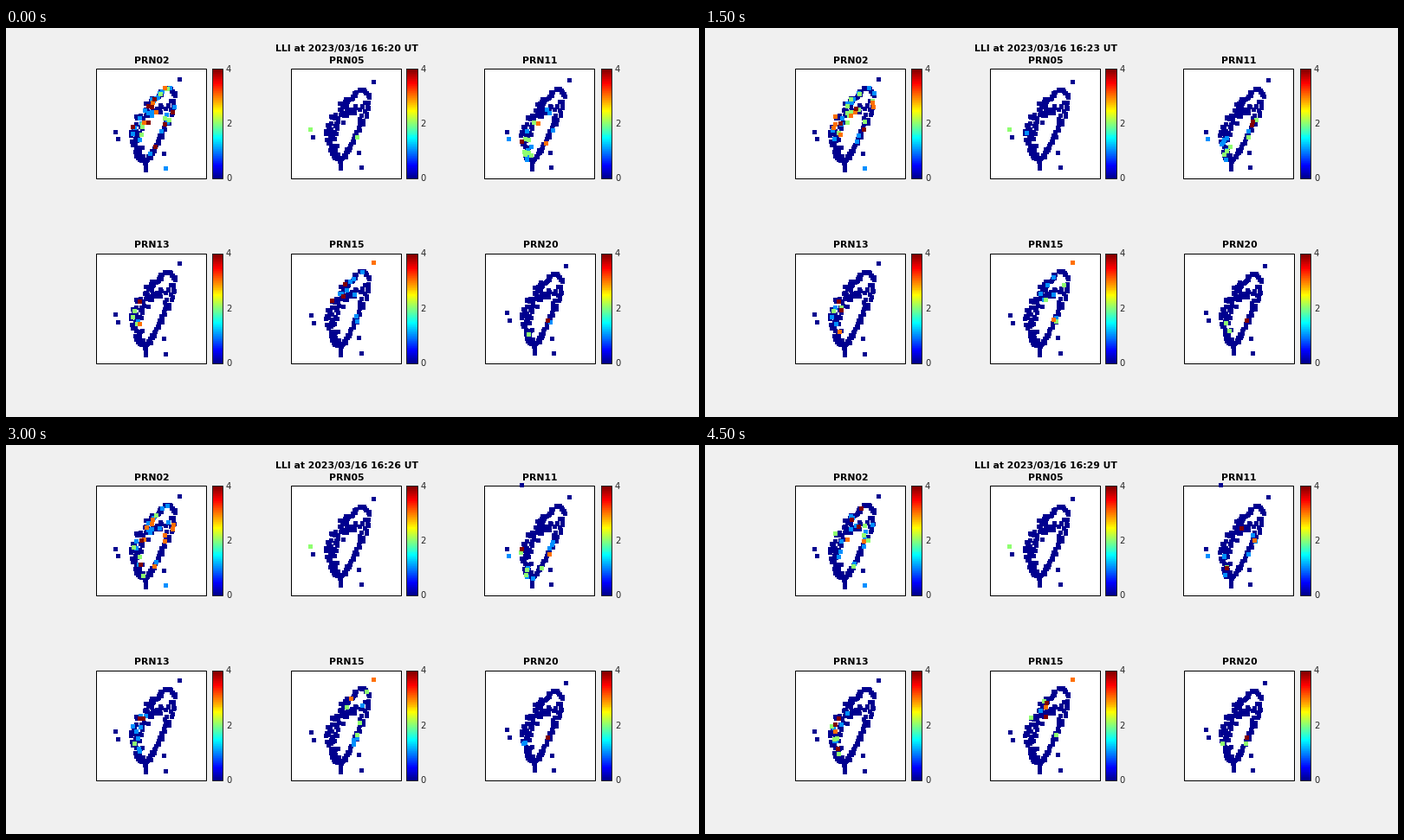
Recreate the animation shown at these times as a matplotlib script. Size 800 px wide and 450 px high, loop 5 s.

```python
import numpy as np
import matplotlib.pyplot as plt
from matplotlib.animation import FuncAnimation
from matplotlib.colors import ListedColormap
from matplotlib.patches import Rectangle

W, H, DPI = 800, 450, 100
PX = 72 / DPI
FRAMES, STEP = 10, 500
SIDE, TALL, BAR = 127, 126.5, 12.4
plt.rcParams["font.family"] = "DejaVu Sans"

# 64-step jet
k = np.arange(64)


def ramp(lo, hi):
    return np.clip(np.minimum(k - lo, hi - k) / 16, 0, 1)


JET = ListedColormap(np.column_stack([ramp(23, 71), ramp(7, 55), ramp(-9, 39)]))
LEVELS = JET(np.minimum(np.arange(5) * 16, 63))


def band(nodes, n, rng):
    """Scatter n stations along a spine of (x, y, half width) nodes."""
    nodes = np.array(nodes, float)
    length = np.r_[0, np.cumsum(np.hypot(*np.diff(nodes[:, :2], axis=0).T))]
    at = np.linspace(0, length[-1], n)
    x, y, half = (np.interp(at, length, c) for c in nodes.T)
    return np.column_stack([x + half * rng.uniform(-1, 1, n),
                            y + half * rng.uniform(-0.4, 0.4, n)])


# Station layout in pixels from the top left corner of a panel
rng = np.random.default_rng(7)
ISLETS = [(96, 12.5), (22, 73), (80.5, 114.5), (25, 81.5), (78.5, 97.5),
          (57, 117), (57, 112)]
BASE = np.vstack([
    ISLETS,
    band([(64, 36, 3), (57, 54, 8), (50, 68, 9), (45, 79, 6), (48, 92, 6), (52, 106, 3)],
         74, rng),
    band([(63, 37, 3), (72, 32, 3), (78, 25, 3), (85, 23, 3), (91, 31, 2)], 24, rng),
    band([(66, 52, 6), (80, 42, 6)], 14, rng),
    band([(89, 36, 3), (88, 46, 3), (83, 58, 4), (79, 70, 3), (72, 85, 3), (58, 109, 2)],
         42, rng),
])

# name, corner, bar x, places of the first three islets,
# steady flag (x, y, level), first and last count, zones (x, y, spread)
PANELS = [
    ("PRN02", (104, 47.4), 238, [(96, 12), (22, 73), (80.5, 115)],
     (80, 115, 1), (42, 22), [(74, 48, 20), (58, 65, 14)]),
    ("PRN05", (329, 47.4), 462.4, [(95, 15), (22, 70.5), (81, 114)],
     (22, 70, 2), (1, 0), [(70, 75, 25)]),
    ("PRN11", (552, 47.4), 687, [(98.5, 13.5), (26.5, 73), (77, 114)],
     (28, 80, 1), (18, 10), [(48, 92, 9), (75, 72, 10)]),
    ("PRN13", (104, 261), 238, [(96, 11.5), (22, 70.5), (80.5, 116)],
     (50, 58, 4), (5, 12), [(49, 62, 7), (48, 82, 8)]),
    ("PRN15", (329, 261), 462.4, [(95, 10.5), (23, 71.5), (81, 115.5)],
     (95, 11, 3), (12, 7), [(82, 28, 8), (77, 70, 8), (60, 48, 7)]),
    ("PRN20", (553, 261), 687, [(93.5, 14.5), (25.5, 68.5), (79, 115.5)],
     (73, 79, 4), (2, 2), [(74, 78, 6), (50, 84, 6)]),
]


def place(anchors):
    """Affine map that carries the base layout onto a panel's islets."""
    pad = np.column_stack([BASE, np.ones(len(BASE))])
    return pad @ np.linalg.solve(pad[:3], np.array(anchors))


def affinity(panel, pts):
    """How readily each station is flagged; the same stations keep recurring."""
    w = np.full(len(pts), 1e-9)
    for x, y, spread in PANELS[panel][6]:
        w += np.exp(-((pts - (x, y)) ** 2).sum(1) / (2 * spread ** 2))
    w *= np.random.default_rng(panel).exponential(size=len(pts))
    return w / w.sum()


def levels(panel, i):
    pts, (x, y, steady), (first, last) = layouts[panel], *PANELS[panel][4:6]
    n = round(first + (last - first) * i / (FRAMES - 1))
    rng = np.random.default_rng(100 * panel + i)
    out = np.zeros(len(pts), int)
    pick = rng.choice(len(pts), n, replace=False, p=weights[panel])
    out[pick] = rng.choice([1, 2, 3, 4], n, p=[0.5, 0.27, 0.13, 0.1])
    out[np.argmin(((pts - (x, y)) ** 2).sum(1))] = steady
    return out


fig = plt.figure(figsize=(W / DPI, H / DPI), dpi=DPI, facecolor="#f0f0f0")
ax = fig.add_axes([0, 0, 1, 1])
ax.axis("off")


def label(x, y, text, size, **kw):
    return ax.text(x, y, text, fontsize=size * PX, va="baseline", **kw)


def box(x, y, w, color, fill="none", z=1):
    ax.add_patch(Rectangle((x, y), w, TALL, fc=fill, ec=color, lw=PX, zorder=z))


layouts = [place(p[3]) for p in PANELS]
weights = [affinity(i, pts) for i, pts in enumerate(layouts)]

for name, (x, y), bx, *_ in PANELS:
    box(x, y, SIDE, "black", "white")
    label(x + 64, y - 6.5, name, 10.9, weight="bold", ha="center")
    ax.pcolormesh([bx, bx + BAR], np.linspace(y + TALL, y, 65), k[:, None],
                  cmap=JET, vmin=0, vmax=63, zorder=2)
    box(bx, y, BAR, "#262626", z=3)
    for v in (0, 2, 4):
        label(bx + 16, y + TALL * (1 - v / 4) + 3.5, str(v), 10, color="#262626")

heading = label(393.5, 27, "", 10.9, weight="bold", ha="center")
dots = ax.scatter([], [], s=(5 * PX) ** 2, marker="s", linewidths=0, zorder=4)
ax.set_xlim(0, W)
ax.set_ylim(H, 0)


def update(i):
    heading.set_text(f"LLI at 2023/03/16 16:{20 + i} UT")
    pos = np.vstack([pts + p[1] for pts, p in zip(layouts, PANELS)])
    val = np.concatenate([levels(p, i) for p in range(len(PANELS))])
    if i >= 6:  # a stray station on the top edge of PRN11
        pos, val = np.vstack([pos, (595.5, 46.5)]), np.append(val, 0)
    order = np.argsort(val, kind="stable")
    dots.set_offsets(pos[order])
    dots.set_facecolors(LEVELS[val[order]])
    return heading, dots


anim = FuncAnimation(fig, update, frames=FRAMES, interval=STEP,
                     repeat=True, repeat_delay=0, blit=False)
plt.show()
```
